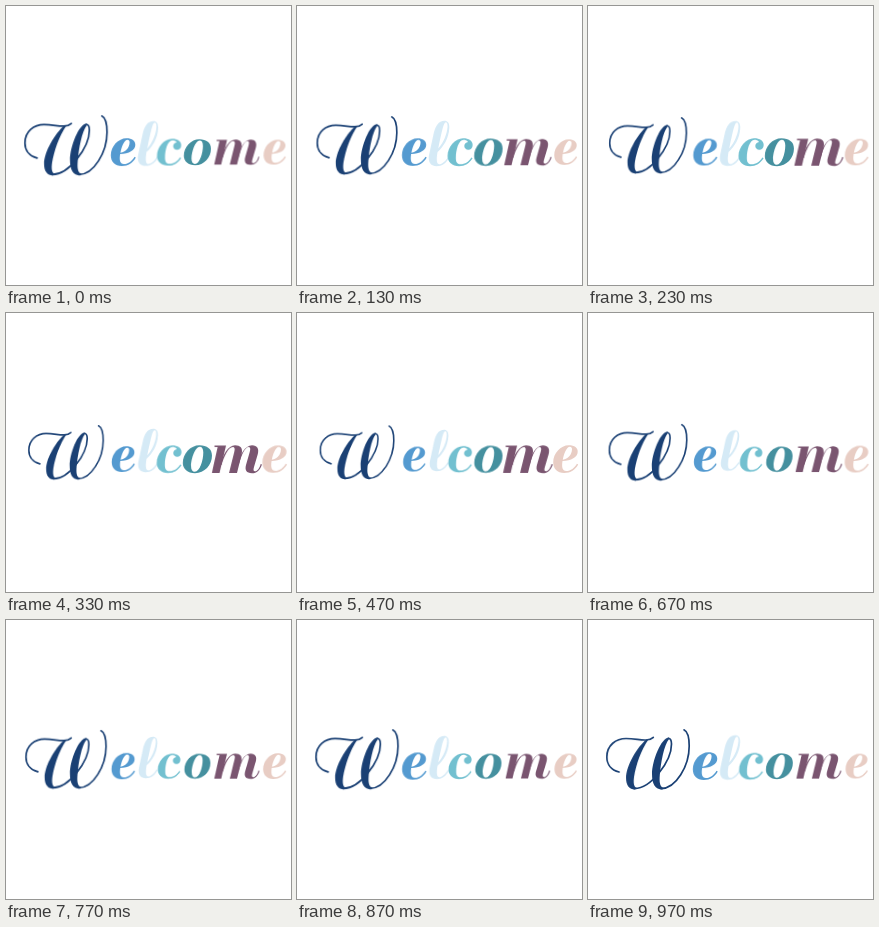
Animation of 285 by 279 pixels, one loop 1000 ms. Source, as an HTML page without scripts:

```html
<!DOCTYPE html>
<html lang="en">
<head>
<meta charset="utf-8">
<title>Welcome</title>
<style>
  html, body { margin: 0; width: 100%; height: 100%; overflow: hidden; background: #fff; }
  svg { display: block; width: 100%; height: 100%; }
  /* Each letter breathes once a second, slightly later than its neighbour. */
  .letter {
    transform-box: fill-box;
    transform-origin: center;
    animation: breathe 500ms cubic-bezier(.364, 0, .636, 1) infinite alternate;
    animation-delay: calc(var(--i) * 88ms - 1060ms);
  }
  @keyframes breathe {
    from { transform: scale(1); }
    to { transform: scale(.89); }
  }
  .hair { fill: none; stroke: #1a4074; stroke-width: 1.7; stroke-linecap: round; }
</style>
</head>
<body>
<svg viewBox="0 0 285 279" role="img" aria-label="Welcome" fill-rule="evenodd">
  <defs>
    <path id="e" d="M15.5 0C21.5 0 24.5 2.5 24.5 6.5C24.5 12 18 15.5 9.3 15.8C8.4 21.5 9 25.8 13 25.8C17.5 25.8 21.5 22.5 23.7 18.5L25 19.2C22 24.5 17.5 27.7 11 27.7C4 27.7 0 23.5 0 17C0 8 7.5 0 15.5 0Z
      M9.6 14.4C15 13.8 18.4 9.5 18.8 4.2C18.9 2.2 18 1.4 16.7 1.4C13.3 1.4 10.5 9 9.6 14.4Z"/>
  </defs>

  <g class="letter" style="--i:0" fill="#1a4074">
    <path class="hair" d="M31 152C23 150 18.8 144 18.8 137C18.8 125 28 118.5 38 118.5C47 118.5 52 120.3 58 120C62 119.8 64 118.5 65.3 117.3"/>
    <path class="hair" d="M46 168.6C63 169 83.5 141 83.5 124C83.5 120 82.5 118.3 80.5 118.3"/>
    <path class="hair" d="M73 168.6C88 168.6 101.2 146 101.2 126C101.2 117 99.5 111.5 96 109.8"/>
    <path d="M58.5 119.3C49 127 38 146 38 158C38 165 41 169.5 47 169.5L49 168C45.5 167.5 45.3 162 46 157C48 145 53 130 60.5 119.3Z"/>
    <path d="M81 117.4C73 117.4 64 141 64 154C64 164 67 169.5 74.5 169.5L75.5 167.8C71.5 167 71.3 161 71.8 155C72.7 143 76 125 81 119Z"/>
  </g>

  <g class="letter" style="--i:1" fill="#549ad0">
    <use href="#e" transform="translate(104.8 132.3)"/>
  </g>

  <g class="letter" style="--i:2" fill="#d5eaf6">
    <path d="M147.5 114.8C151 114.8 152.5 117.5 152.3 122C151.8 132 146.5 141 140.5 146C139.3 153 139.3 158.3 142 158.3C145 158.3 149 155 151.3 150.5L152.5 151.2C149.5 157 145 160.2 139.5 160.2C133.5 160.2 130.8 156 132 149L136.3 129C138.2 120 141.5 114.8 147.5 114.8Z
      M141.2 142.6C146.5 136.5 150 128 150.5 121C150.7 117.5 150 116.3 148.8 116.3C146.5 116.3 145 125 141.2 142.6Z"/>
  </g>

  <g class="letter" style="--i:3" fill="#72c0d0">
    <path d="M166 132.3C172 132.3 175.7 135 175.7 139C175.7 142 173.7 143.7 171.3 143.7C169 143.7 167.3 142 167.3 140C167.3 137.7 169 136.5 171 136C170 134.2 168 133.8 166.5 133.8C161.5 133.8 158.8 144 158.8 152C158.8 156.5 160.5 158.3 163.5 158.3C168 158.3 172 155.5 174.3 151.5L175.6 152.2C172.5 157.2 168 160.2 162 160.2C155 160.2 150.5 156 150.5 150C150.5 141 158 132.3 166 132.3Z"/>
  </g>

  <g class="letter" style="--i:4" fill="#45909f">
    <path d="M193.5 132.3C201 132.3 206 136 206 142.5C206 152 198.5 160.2 189 160.2C181.5 160.2 176.8 156 176.8 150C176.8 140.5 184.5 132.3 193.5 132.3Z
      M193.8 133.7C189 133.7 185 146 185 153C185 156.8 186.3 158.8 188.7 158.8C193.8 158.8 197.3 147 197.3 139.5C197.3 135.5 196 133.7 193.8 133.7Z"/>
  </g>

  <g class="letter" style="--i:5" fill="#7a5570">
    <path d="M208.5 132.5H220L213.5 160H205.8L211.6 133.9H208.5Z"/>
    <path d="M214 152C217 142 222 132.3 229 132.3C234.5 132.3 237 135 235.7 141L231 160H223L228.2 139C229.2 135.3 228.5 133.9 226.7 133.9C222.5 133.9 218 143 215.5 152Z"/>
    <path d="M231.2 152C234 142 239 132.3 246 132.3C251.5 132.3 253.2 136 251.8 141L248 154C247.1 157 247.4 158.3 249 158.3C251.3 158.3 253.8 155 254.7 151L256 151.4C254 157 251 160.2 246 160.2C240.3 160.2 238.7 157 240 152L243.7 139C244.7 135.5 244.3 133.9 242.7 133.9C239 133.9 235.2 142 232.7 152Z"/>
  </g>

  <g class="letter" style="--i:6" fill="#e8cdc4">
    <use href="#e" transform="translate(256.2 132.3)"/>
  </g>
</svg>
</body>
</html>
```
